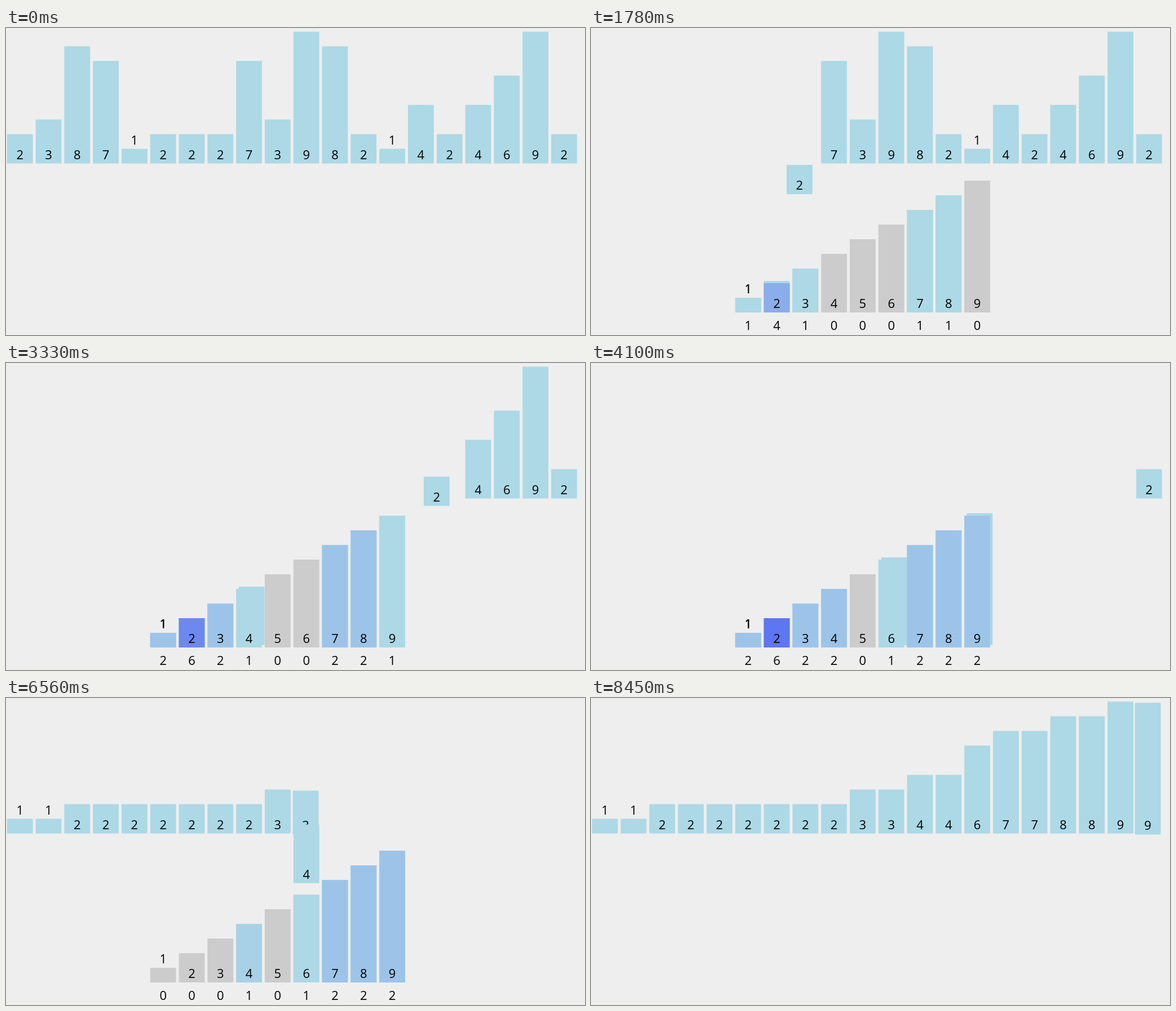
An HTML page that plays this animation: 1027 px wide and 545 px high, repeating every 8.52 s.

```html
<!DOCTYPE html>
<html lang="en">
<head>
<meta charset="utf-8">
<title>Counting sort</title>
<style>
  html, body { margin: 0; width: 100%; height: 100%; overflow: hidden; background: #eee; }
  svg { display: block; width: 1027px; height: 545px; }
  text { font: 22px "Open Sans", "Noto Sans", sans-serif; text-anchor: middle; fill: #000; }
</style>
</head>
<body>
<svg id="stage" viewBox="0 0 1027 545"></svg>
<script>
const LOOP = 8520, TICK = 77;
const VALUES = [2, 3, 8, 7, 1, 2, 2, 2, 7, 3, 9, 8, 2, 1, 4, 2, 4, 6, 9, 2];
const N = VALUES.length;
const LEFT = 1.8, PITCH = 50.8, WIDTH = 45.8, UNIT = 26;
const TOP = 240.5, BOTTOM = 505, FIRST_BUCKET = 5;
const GREY = [204, 204, 204], LIGHT = [173, 216, 230], BLUE = [0, 0, 255];

// Time to move number: -1..0 fade in, 0..20 count, 20..40 collect, 40..41 fade out.
const PACE = [
  [0, -2], [170, -0.9], [1180, 4.685], [1780, 7.206], [3330, 15.05],
  [5170, 24.49], [6560, 31.667], [7440, 35.331], [8450, 40.995]
];

const clamp = (v, lo = 0, hi = 1) => Math.min(hi, Math.max(lo, v));
const mix = (a, b, t) => a + (b - a) * t;
const slotX = i => LEFT + PITCH * i;
const bucketX = v => slotX(FIRST_BUCKET + v - 1);
const rgb = (a, b, t) => `rgb(${a.map((v, i) => Math.round(mix(v, b[i], t)))})`;
const shade = n => n < 1 ? rgb(GREY, LIGHT, n) : rgb(LIGHT, BLUE, (n - 1) / 11);
const place = (el, x, y) => el.setAttribute("transform", `translate(${x.toFixed(2)} ${y.toFixed(2)})`);

function add(parent, tag, attrs = {}, label = "") {
  const el = document.createElementNS("http://www.w3.org/2000/svg", tag);
  for (const key in attrs) el.setAttribute(key, attrs[key]);
  el.textContent = label;
  return parent.appendChild(el);
}

// A bar standing on its own origin, with its digit inside or above it.
function makeBar(parent, value) {
  const group = add(parent, "g");
  const rect = add(group, "rect", { y: -UNIT * value, width: WIDTH, height: UNIT * value, fill: shade(1) });
  add(group, "text", { x: WIDTH / 2, y: value === 1 ? -8 - UNIT : -8 }, value);
  return { group, rect };
}

const stage = document.getElementById("stage");
const bars = VALUES.map(v => makeBar(stage, v));
const shelf = add(stage, "g");
const buckets = Array.from({ length: 9 }, (_, i) => {
  const bucket = makeBar(shelf, i + 1);
  bucket.count = add(bucket.group, "text", { x: WIDTH / 2, y: 31 }, 0);
  place(bucket.group, bucketX(i + 1), BOTTOM);
  return bucket;
});

const order = VALUES.map((_, i) => i).sort((a, b) => VALUES[a] - VALUES[b]);
const rank = VALUES.map((_, i) => order.indexOf(i));

// Each stretch between key times advances in equal ticks.
function pace(time) {
  const i = PACE.findIndex(([t]) => t > time);
  if (i < 0) return PACE[PACE.length - 1][1];
  const [t0, c0] = PACE[i - 1], [t1, c1] = PACE[i];
  const ticks = Math.round((t1 - t0) / TICK);
  return mix(c0, c1, Math.floor((time - t0) / (t1 - t0) * ticks) / ticks);
}

// A move halts just short of its goal and settles one move later.
function progress(step, k) {
  return step >= k + 2 ? 1 : clamp(step - k, 0, k < N ? 0.985 : 0.9925);
}

function draw(time) {
  const step = pace(time);
  const counts = Array(10).fill(0), levels = Array(10).fill(0);

  VALUES.forEach((v, i) => {
    const down = progress(step, i), up = progress(step, N + rank[i]);
    const home = slotX(up > 0 ? rank[i] : i);
    const depth = up > 0 ? 1 - up : down;
    place(bars[i].group, mix(home, bucketX(v), depth), mix(TOP, BOTTOM, depth));
    counts[v] += (down > 0) - (up > 0);
    levels[v] += depth;
  });

  buckets.forEach((b, i) => {
    b.rect.setAttribute("fill", shade(levels[i + 1]));
    b.count.textContent = counts[i + 1];
  });
  shelf.setAttribute("opacity", clamp(Math.min(step + 1, 2 * N + 0.99 - step)));
}

const start = performance.now();
function frame() {
  draw((performance.now() - start) % LOOP);
  requestAnimationFrame(frame);
}
frame();
</script>
</body>
</html>
```
